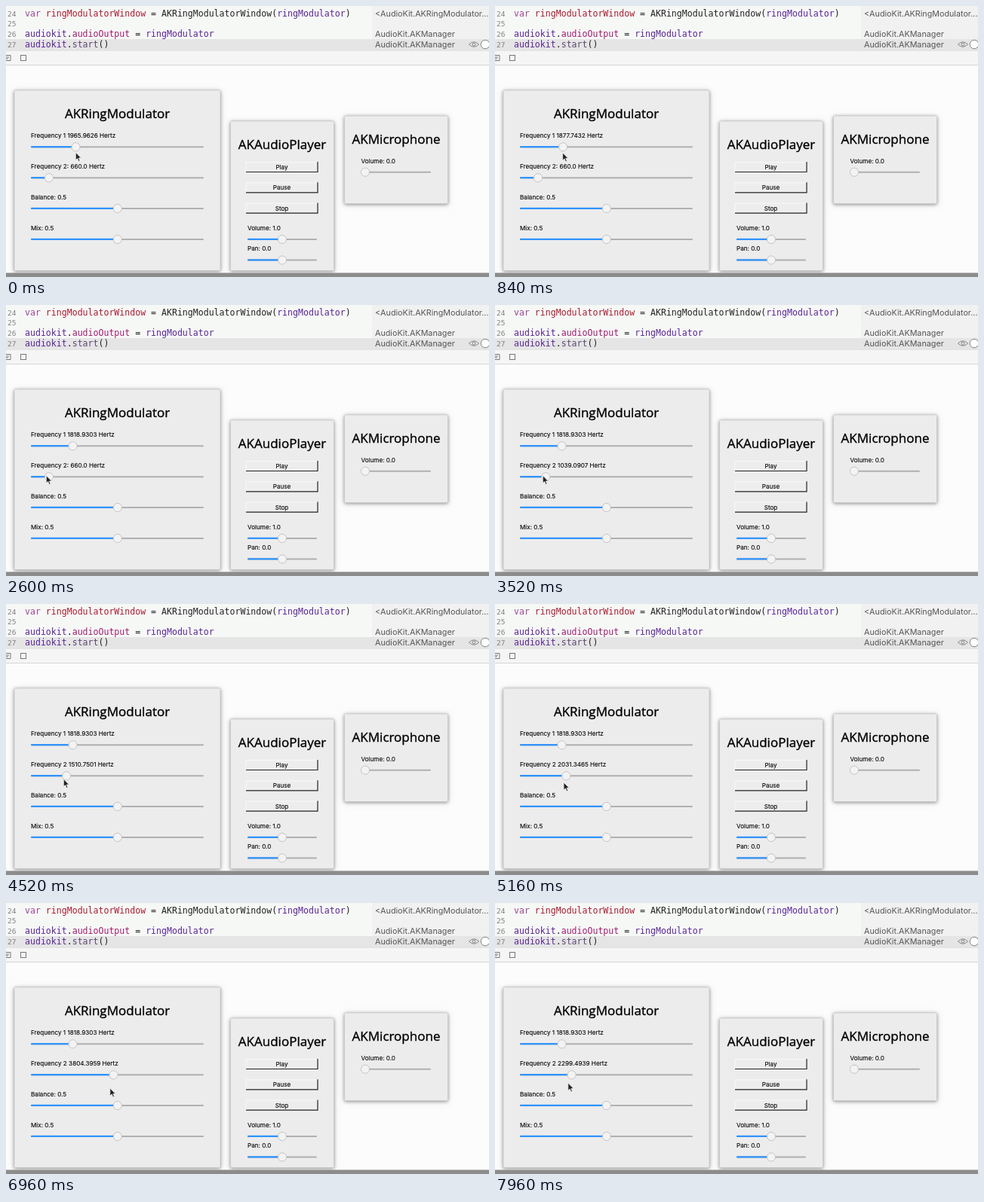
Write an HTML page that moves like this. It is 640 by 360 pixels and loops after 8 s.

```html
<!DOCTYPE html>
<html lang="en">
<head>
<meta charset="utf-8">
<title>Ring modulator playground</title>
<style>
  html, body { margin: 0; width: 100%; height: 100%; overflow: hidden; background: #fff; }
  svg { display: block; width: 100%; height: 100%; }
  text { white-space: pre; }
  .code { font: 11.57px "DejaVu Sans Mono", monospace; }
  .result { font: 10.75px Inter, sans-serif; fill: #555; }
  .title { font: 17px "Open Sans", sans-serif; text-anchor: middle; fill: #000; stroke: #000; stroke-width: .35; }
  .label { font: 8.15px Inter, sans-serif; fill: #000; stroke: #000; stroke-width: .1; }
  .panel { fill: #ececec; stroke: #c8c8c8; stroke-width: .7;
    filter: drop-shadow(0 1px 2px rgba(0,0,0,.38)) drop-shadow(0 1px 5px rgba(40,60,40,.12)); }
  .knob { fill: #f3f3f3; stroke: #bababa; stroke-width: .8; }
</style>
</head>
<body>
<svg id="stage" viewBox="0 0 640 360"></svg>
<script>
const LOOP = 8000, STEP = 40;
const DRAG_2 = 2760;            // second slider is grabbed
const stage = document.getElementById('stage');

const rect = (x, y, w, h, fill, extra = '') =>
  `<rect x="${x}" y="${y}" width="${w}" height="${h}" fill="${fill}" ${extra}/>`;
const text = (cls, x, y, content, extra = '') =>
  `<text class="${cls}" x="${x}" y="${y}" ${extra}>${content}</text>`;
const span = (color, content) => `<tspan fill="${color}">${content}</tspan>`;

const panel = (x, y, w, h, title, titleY) =>
  `<rect class="panel" x="${x}" y="${y}" width="${w}" height="${h}" rx="1.5"/>` +
  text('title', x + w / 2, titleY, title);

const slider = (x, y, w, knobX, id = '') =>
  rect(x, y - 1, w, 2, '#b0b0b0', 'rx="1"') +
  rect(x, y - 1.3, knobX - x, 2.3, '#2f93fc', `rx="1" id="${id}fill"`) +
  `<circle class="knob" id="${id}knob" cx="${knobX}" cy="${y}" r="5.6"/>`;

const button = (y, name) =>
  rect(318, y, 95, 14, '#ededed') +
  `<path d="M318 ${y + 13.5}V${y + .5}H413" fill="none" stroke="#f8f8f8"/>` +
  `<path d="M318 ${y + 13.5}H413V${y}" fill="none" stroke="#222" stroke-width="1.2"/>` +
  text('label', 365.5, y + 10, name, 'text-anchor="middle"');

function editor() {
  const mauve = '#9a4a94', red = '#a81c30', magenta = '#a01c70', purple = '#5a2596', ink = '#222';
  const lineNumber = (n, y) => text('code', 2, y, n, 'style="font-size:9.5px" fill="#808080"');
  return rect(0, 0, 640, 59, '#f6f8f6') +
    rect(485, 0, 155, 59, '#f1f1f1') + rect(0, 44, 640, 14.5, '#e5e5e5') +
    lineNumber(24, 13.5) + lineNumber(25, 27) + lineNumber(26, 40.5) + lineNumber(27, 54.5) +
    text('code', 25, 14, span(mauve, 'var ') + span(red, 'ringModulatorWindow') +
      span(ink, ' = AKRingModulatorWindow(') + span(purple, 'ringModulator') + span(ink, ')')) +
    text('code', 25, 41, span(purple, 'audiokit') + span(ink, '.') + span(magenta, 'audioOutput') +
      span(ink, ' = ') + span(purple, 'ringModulator')) +
    text('code', 25, 55, span(purple, 'audiokit') + span(ink, '.') + span('#5b4670', 'start') + span(ink, '()')) +
    text('result', 489, 14, '&lt;AudioKit.AKRingModulator...') +
    text('result', 489, 41, 'AudioKit.AKManager') +
    text('result', 489, 55, 'AudioKit.AKManager') +
    `<g fill="none" stroke="#888">
      <path d="M613.5 51Q620 44.5 626.5 51Q620 57.5 613.5 51Z"/><circle cx="620" cy="51" r="2"/>
      <circle cx="635" cy="51" r="5.8" fill="#fff"/></g>` +
    rect(0, 58.5, 640, 20, '#f4f5f4') +
    `<path d="M0 59H640M0 78.5H640" stroke="#cfcfcf" stroke-width=".8"/>
     <g fill="none" stroke="#777"><path d="M0 65.5H6V72.5H0M0 68H4M0 70H3"/>
     <rect x="19.5" y="65.5" width="7" height="7"/></g>`;
}

const valueToX = v => 39 + v / 36.75;

stage.innerHTML = rect(0, 0, 640, 360, '#fcfcfc') + editor() +
  panel(11, 112, 273, 239.5, 'AKRingModulator', 149) +
  '<text class="label" id="label1" x="33" y="175"/>' + slider(33, 187.3, 229, 92.5, 'f1') +
  '<text class="label" id="label2" x="33" y="216"/>' + slider(33, 228.3, 229, 57, 'f2') +
  text('label', 33, 257, 'Balance: 0.5') + slider(33, 269, 229, 147.8) +
  text('label', 33, 298, 'Mix: 0.5') + slider(33, 310, 229, 147.8) +
  panel(297.5, 153, 137, 198.5, 'AKAudioPlayer', 190) +
  button(207, 'Play') + button(234.3, 'Pause') + button(261.6, 'Stop') +
  text('label', 320, 298, 'Volume: 1.0') + slider(320, 310, 92, 366) +
  text('label', 320, 325, 'Pan: 0.0') + slider(320, 337.5, 92, 366) +
  panel(448.5, 146, 137, 116.5, 'AKMicrophone', 182.5) +
  text('label', 470.5, 208.5, 'Volume: 0.0') + slider(471, 220.7, 92, 476) +
  rect(0, 354.5, 640, 5.5, '#8c8c8c') +
  `<path id="cursor" d="M-.7 -.4V9.8L1.7 7.6 3.3 11.4 5 10.6 3.4 7H6.6Z" fill="#222"
    stroke="#f4f4f4" stroke-width=".8" stroke-linejoin="round"/>`;

// Keys are [time, value, ...]; linear between them.
const frequency1 = [[0, 1965.9626], [1400, 1818.9303]];
const frequency2 = [[DRAG_2, 660], [3520, 1039.0907], [4520, 1510.7501], [5760, 2519.4057],
  [6640, 3804.3959], [6960, 3804.3959], [7960, 2299.4939]];
const pointer = [[0, 93, 195], [1400, 88.5, 195.5], [1640, 88.5, 195.5], [2480, 54, 227],
  [DRAG_2, 54, 227], [3520, 64, 227], [4520, 77, 233], [5760, 105.5, 241.5],
  [6640, 138.5, 246.5], [6960, 138.5, 246.5], [7960, 97.5, 239.5]];

function sample(keys, t) {
  const next = keys.findIndex(k => k[0] > t);
  if (next === 0) return keys[0].slice(1);
  if (next < 0) return keys[keys.length - 1].slice(1);
  const a = keys[next - 1], b = keys[next], p = (t - a[0]) / (b[0] - a[0]);
  return a.slice(1).map((v, i) => v + (b[i + 1] - v) * p);
}

const find = id => document.getElementById(id);

function setFrequency(n, value, caption) {
  const x = valueToX(value);
  find(`f${n}knob`).setAttribute('cx', x);
  find(`f${n}fill`).setAttribute('width', x - 33);
  find(`label${n}`).textContent = `Frequency ${n}${caption} Hertz`;
}

function draw(now) {
  const t = Math.floor(now % LOOP / STEP) * STEP;
  const [v1] = sample(frequency1, t), [v2] = sample(frequency2, t);
  setFrequency(1, v1, ' ' + v1.toFixed(4));
  setFrequency(2, v2, t <= DRAG_2 ? ': 660.0' : ' ' + v2.toFixed(4));
  find('cursor').setAttribute('transform', `translate(${sample(pointer, t)})`);
}

const start = performance.now();
function tick() {
  draw(performance.now() - start);
  requestAnimationFrame(tick);
}
tick();
</script>
</body>
</html>
```
